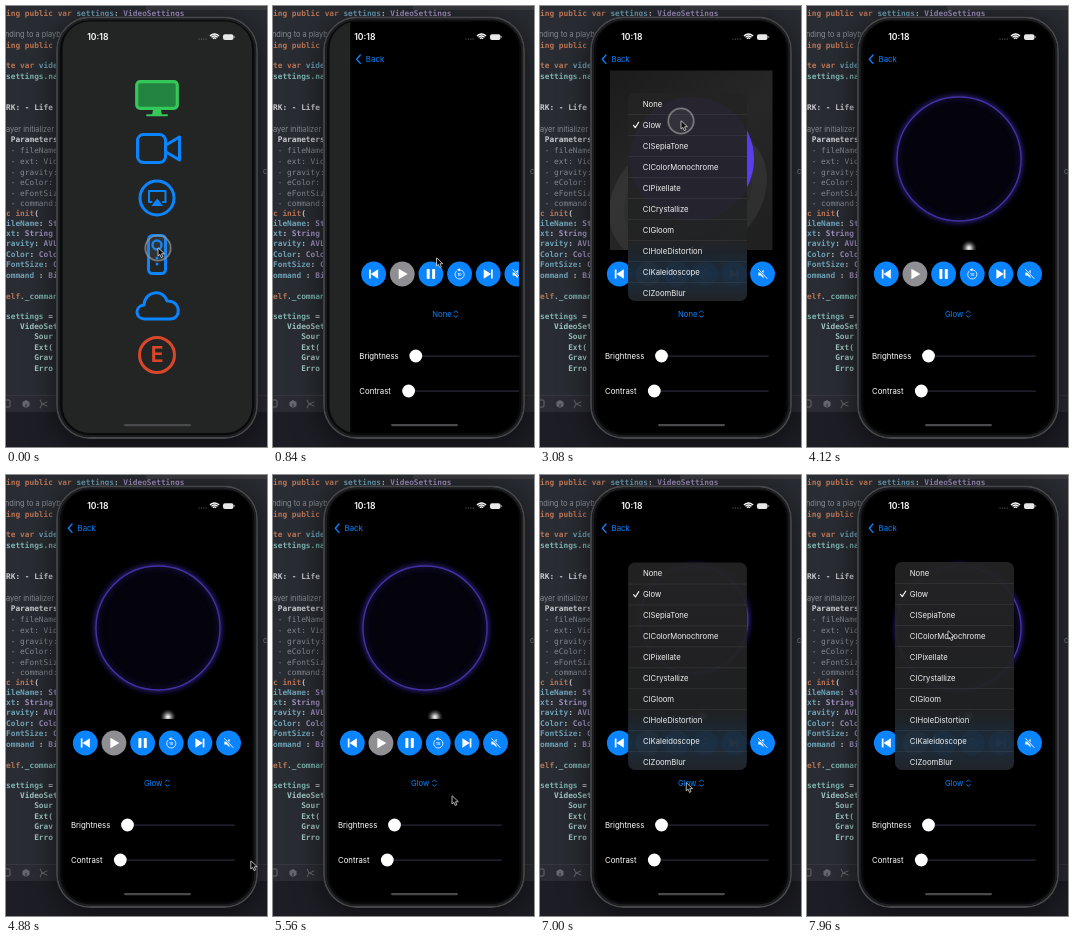
Write an HTML page with a canvas that moves like this. It is 261 px wide and 441 px high and loops after 8 s.

```html
<!DOCTYPE html>
<html lang="en">
<head>
<meta charset="utf-8">
<title>Player filters</title>
<style>
html, body { margin: 0; width: 100%; height: 100%; overflow: hidden; background: #25282e; }
canvas { display: block; width: 261px; height: 441px; }
</style>
</head>
<body>
<canvas id="stage"></canvas>
<script>
const W = 261, H = 441, LOOP = 8000;
const BLUE = '#0a84ff', GREY = '#8e8e93', WHITE = '#fff';
const SANS = 'Inter, "Liberation Sans", sans-serif';
const MONO = '"DejaVu Sans Mono", "Liberation Mono", monospace';
const canvas = document.getElementById('stage');
const c = canvas.getContext('2d');
const dpr = window.devicePixelRatio || 1;
canvas.width = W * dpr;
canvas.height = H * dpr;

const clamp = v => Math.max(0, Math.min(1, v));
const span = (t, a, b) => clamp((t - a) / (b - a));
const smooth = p => p * p * (3 - 2 * p);
const easeOut = p => 1 - (1 - p) ** 3;
const mix = (a, b, p) => a + (b - a) * p;

function text(s, x, y, size, color, weight = 400, align = 'left', family = SANS) {
  c.font = `${weight} ${size}px ${family}`;
  c.textAlign = align;
  c.textBaseline = 'middle';
  c.fillStyle = color;
  c.fillText(s, x, y);
}
function box(x, y, w, h, r, fill) {
  c.beginPath();
  c.roundRect(x, y, w, h, r);
  if (fill) { c.fillStyle = fill; c.fill(); }
}
function disc(x, y, r, fill) {
  c.beginPath();
  c.arc(x, y, r, 0, Math.PI * 2);
  if (fill) { c.fillStyle = fill; c.fill(); }
}
function pen(color, width) {
  c.strokeStyle = color;
  c.lineWidth = width;
  c.lineCap = c.lineJoin = 'round';
  c.stroke();
}
function poly(pts, fill) {
  c.beginPath();
  for (let i = 0; i < pts.length; i += 2) c.lineTo(pts[i], pts[i + 1]);
  if (fill) { c.closePath(); c.fillStyle = fill; c.fill(); }
}
function layer(draw, alpha = 1) {
  c.save();
  c.globalAlpha *= alpha;
  draw();
  c.restore();
}

// Editor behind the phone: [y, [text, colour], ...]
const WORD = '#b87556', NAME = '#6fa3b8', TYPE = '#a593c4', TEAL = '#7fb5b0';
const MINT = '#a3c9c4', DIM = '#858a91', PALE = '#c9cbcf';
const CODE = [
  [8, ['ing public var ', WORD], ['settings', NAME], [': ', PALE], ['VideoSettings', TYPE]],
  [40, ['ing ', WORD], ['public ', WORD], ['v', WORD]],
  [60, ['te var ', WORD], ['vide', NAME]],
  [71, ['settings', TEAL], ['.nam', TEAL]],
  [102, ['RK: - Life', PALE]],
  [134, [' Parameters', PALE]],
  [145, [' - fileName', DIM]],
  [156, [' - ext: Vide', DIM]],
  [167, [' - gravity:', DIM]],
  [177, [' - eColor:', DIM]],
  [188, [' - eFontSiz', DIM]],
  [198, [' - command:', DIM]],
  [208, ['c init', WORD], ['(', PALE]],
  [218, ['ileName', NAME], [': ', PALE], ['St', TYPE]],
  [228, ['xt', NAME], [': ', PALE], ['String', TYPE]],
  [238, ['ravity', NAME], [': ', PALE], ['AVL', TYPE]],
  [249, ['Color', NAME], [': ', PALE], ['Colo', TYPE]],
  [259, ['FontSize', NAME], [': ', PALE], ['C', TYPE]],
  [270, ['ommand ', NAME], [': ', PALE], ['Bi', TYPE]],
  [291, ['elf', WORD], ['._comman', TEAL]],
  [311, ['settings', TEAL], [' =', PALE]],
  [321, ['   VideoSet', MINT]],
  [331, ['      Sour', MINT]],
  [342, ['      Ext(', MINT]],
  [352, ['      Grav', MINT]],
  [363, ['      Erro', MINT]]
];

function editor() {
  c.fillStyle = '#292c32';
  c.fillRect(0, 0, W, H);
  c.fillStyle = '#3a3b3f';
  c.fillRect(140, 0, 121, 4);
  for (const [y, ...parts] of CODE) {
    let x = 0;
    for (const [s, color] of parts) {
      text(s, x, y, 7.8, color, color === DIM ? 400 : 700, 'left', MONO);
      x += c.measureText(s).width;
    }
  }
  text('nding to a playb', -1, 29, 7.4, DIM);
  text('ayer initializer', 0, 124, 7.4, DIM);
  text('c', 257, 165.5, 7.4, DIM);

  c.fillStyle = '#2b2c33';
  c.fillRect(0, 389, W, 17);
  c.fillStyle = '#37383e';
  c.fillRect(0, 389, W, 1);
  c.fillStyle = '#1d1d25';
  c.fillRect(0, 406, W, 35);
  const ink = '#66686e';
  box(-3, 394, 7, 7, 1); pen(ink, 1);
  poly([20, 394, 23.5, 396, 23.5, 400, 20, 402, 16.5, 400, 16.5, 396], ink);
  poly([20, 398, 20, 401]); pen('#2b2c33', 1);
  poly([34, 394, 36, 398, 41, 396]); pen(ink, 1);
  poly([34, 402, 36, 398, 41, 400]); pen(ink, 1);
}

const screenPath = () => box(56.5, 15.5, 189.5, 411.5, 27);

function phone() {
  layer(() => {
    c.shadowColor = 'rgba(0,0,0,.6)';
    c.shadowBlur = 30 * dpr;
    c.shadowOffsetY = 5 * dpr;
    box(50, 10.5, 202, 422.5, 34, '#08090a');
  });
  box(51, 11.5, 200, 420.5, 33); pen('#45474a', 1.8);
  box(53, 13.3, 196.2, 416.8, 31); pen('#1d1e20', 1.8);
}

function status() {
  text('10:18', 81.2, 31, 8.6, WHITE, 600);
  for (let i = 0; i < 4; i++) disc(193 + i * 2.4, 33, .6, '#777');
  for (let i = 1; i < 4; i++) {
    c.beginPath();
    c.arc(208.5, 34, i * 2, -Math.PI * .77, -Math.PI * .23);
    c.strokeStyle = WHITE;
    c.lineWidth = 1.4;
    c.lineCap = 'butt';
    c.stroke();
  }
  box(217, 28.3, 10.5, 5.6, 2, '#e8e8e8');
  box(228.2, 30, .9, 2, .5, '#999');
}

function home() {
  c.fillStyle = '#232524';
  c.fillRect(56, 15, 191, 413);
  const green = '#35c759', red = '#d9472b';

  box(130.7, 75.7, 40.6, 26.6, 3.5, '#238340'); pen(green, 3.2);
  poly([147, 104, 155, 104, 156, 109, 146, 109], green);
  poly([141, 109.2, 161, 109.2]); pen(green, 2);

  box(131.5, 128.5, 28, 28, 6); pen(BLUE, 3);
  poly([160, 139, 173.5, 131, 173.5, 154, 160, 146]); pen(BLUE, 3);

  disc(151, 192, 17); pen(BLUE, 3);
  poly([145.5, 196, 143, 196, 143, 185, 159.5, 185, 159.5, 196, 157, 196]); pen(BLUE, 2);
  poly([151.2, 192.5, 157, 200, 145.4, 200], BLUE);

  box(142.5, 229.5, 17, 38, 4); pen(BLUE, 3);
  disc(151, 239, 4.5); pen(BLUE, 2.4);
  disc(151, 252, 1.5, BLUE);
  disc(151, 258, 1.5, BLUE);

  c.beginPath();
  c.moveTo(139, 313);
  c.bezierCurveTo(129, 313, 128, 300, 138, 299);
  c.bezierCurveTo(139, 284, 158, 283, 161, 295);
  c.bezierCurveTo(175, 294, 176, 313, 164, 313);
  c.closePath();
  pen(BLUE, 3);

  disc(151, 349, 17.5); pen(red, 3);
  text('E', 151.2, 349.6, 21, red, 700, 'center');
}

// One plain circle that grows in each time the clip restarts.
function emblem(t, glow) {
  const p = smooth(span((t - 1000) % 5200, 120, 1020));
  if (p <= 0) return;
  const x = mix(167, 152, p), y = mix(97, 153, p), r = mix(5, 62, p);
  if (!glow) { disc(x, y, r, '#5b3df0'); return; }
  layer(() => {
    c.shadowColor = '#3a2aa0';
    c.shadowBlur = 6 * dpr;
    disc(x, y, r, '#04030c');
    pen('#4032a0', 1.4);
  });
}

function video(t) {
  if (t < 1000) return;
  const glow = t >= 3100;
  c.save();
  c.beginPath();
  c.rect(70, 64.5, 162.5, 179.5);
  c.clip();
  if (glow) {
    c.fillStyle = '#000';
    c.fillRect(70, 64, 163, 180);
  } else {
    const bg = c.createLinearGradient(70, 64, 200, 244);
    bg.addColorStop(0, '#1b1b1b');
    bg.addColorStop(.5, '#272727');
    bg.addColorStop(1, '#202020');
    c.fillStyle = bg;
    c.fillRect(70, 64, 163, 180);
    for (let i = 0; i < 5; i++) {
      c.beginPath();
      c.ellipse(148, 190, 84 - i * 16, 64 - i * 12, -.55, 0, 7);
      c.fillStyle = i % 2 ? 'rgba(0,0,0,.1)' : 'rgba(255,255,255,.06)';
      c.fill();
    }
  }
  emblem(t, glow);
  if (glow) {
    const g = c.createRadialGradient(162, 242, 0, 162, 242, 8);
    g.addColorStop(0, '#fff');
    g.addColorStop(.3, '#aaa');
    g.addColorStop(1, 'rgba(60,60,60,0)');
    c.fillStyle = g;
    c.fillRect(153, 234, 18, 10);
  } else {
    poly([161, 239.5, 161, 243, 163.8, 242, 161, 239.5]); pen('#999', .6);
  }
  c.restore();
}

function skip() {
  poly([2.8, -4.5, 4.5, -4.5, 4.5, 4.5, 2.8, 4.5], WHITE);
  poly([-4.5, -4.8, 2.8, 0, -4.5, 4.8], WHITE);
}
const ICONS = [
  () => { c.scale(-1, 1); skip(); },
  () => poly([-3.6, -5.2, 5.4, 0, -3.6, 5.2], WHITE),
  () => { box(-4.2, -5, 3, 10, .7, WHITE); box(1.2, -5, 3, 10, .7, WHITE); },
  () => {
    c.beginPath(); c.arc(0, .4, 4.6, -1.9, 3.9); pen(WHITE, .8);
    poly([-2.6, -4.3, .2, -5.8, .2, -2.8], WHITE);
    text('10', 0, .8, 4, WHITE, 600, 'center');
  },
  skip,
  () => {
    poly([-4.2, -1.6, -2, -1.6, 1, -4.2, 1, 4.2, -2, 1.6, -4.2, 1.6], WHITE);
    poly([-4, -4.5, 4.5, 4.5]); pen(BLUE, 2.2);
    poly([-4, -4.5, 4.5, 4.5]); pen(WHITE, .9);
  }
];

function slider(label, y, start, knob) {
  text(label, 65, y + .3, 7.8, WHITE);
  box(start, y - .6, 229 - start, 1.3, .6, '#2a2838');
  disc(knob, y, 6.4, WHITE);
}

function player(t, press) {
  c.fillStyle = '#000';
  c.fillRect(56, 15, 195, 413);
  poly([66, 49, 62.3, 53.2, 66, 57.4]); pen(BLUE, 1.3);
  text('Back', 71.5, 53.5, 7.9, BLUE);
  video(t);
  ICONS.forEach((icon, i) => layer(() => {
    c.translate(79.3 + i * 28.65, 268);
    disc(0, 0, 12.4, i === 1 ? GREY : BLUE);
    icon();
  }));
  layer(() => {
    text(t < 3100 ? 'None' : 'Glow', 138, 308.3, 7.7, BLUE);
    poly([159.6, 306.6, 161.4, 304.8, 163.2, 306.6]); pen(BLUE, .9);
    poly([159.6, 309.6, 161.4, 311.4, 163.2, 309.6]); pen(BLUE, .9);
  }, 1 - .4 * press);
  slider('Brightness', 350, 115, 121.5);
  slider('Contrast', 385, 108, 114.3);
}

const FILTERS = ['None', 'Glow', 'CISepiaTone', 'CIColorMonochrome', 'CIPixellate',
  'CICrystallize', 'CIGloom', 'CIHoleDistortion', 'CIKaleidoscope', 'CIZoomBlur'];

function menu(t) {
  const first = span(t, 2300, 2650) * (1 - span(t, 3080, 3320));
  const p = easeOut(Math.max(first, span(t, 6700, 7050)));
  if (p <= 0) return;
  const chosen = t < 3000 ? 0 : 1;
  layer(() => {
    c.translate(147, 300);
    c.scale(mix(.2, 1, p), mix(.2, 1, p));
    c.translate(-147, -300);
    const g = c.createLinearGradient(0, 87, 0, 295);
    g.addColorStop(0, 'rgba(36,35,36,.95)');
    g.addColorStop(.72, 'rgba(33,34,36,.95)');
    g.addColorStop(.87, 'rgba(27,45,63,.97)');
    g.addColorStop(1, 'rgba(34,37,41,.97)');
    box(88, 87, 119, 208, 7, g);
    FILTERS.forEach((name, i) => {
      const y = 98 + i * 21;
      text(name, 102.8, y + .2, 7.7, '#f1f1f1');
      if (i) {
        c.fillStyle = 'rgba(120,120,125,.28)';
        c.fillRect(88, y - 10.7, 119, .6);
      }
      if (i === chosen) {
        poly([93.5, y + .3, 95.3, y + 2.6, 98.7, y - 2.8]);
        pen(WHITE, 1.1);
      }
    });
  }, clamp(p * 1.3));
}

// Pointer path: time, x, y
const PATH = [
  [0, 152, 242], [440, 152, 242], [840, 163.5, 252], [1250, 163.5, 252], [1900, 148, 307],
  [2350, 148, 307], [2860, 141, 115], [3350, 141, 115], [3351, 264, 405], [4650, 264, 405],
  [5400, 179, 321], [5640, 179, 321], [6200, 146.3, 309.5], [6950, 146.3, 309.5],
  [7800, 141, 156], [8000, 141, 156]
];
const PRESSES = [[-200, 280], [2100, 2290], [2930, 3090], [6380, 6650]];

function pointer(t) {
  const i = PATH.findIndex(k => k[0] > t);
  const a = PATH[i - 1], b = PATH[i];
  const p = smooth(span(t, a[0], b[0]));
  return [mix(a[1], b[1], p), mix(a[2], b[2], p)];
}
function pressed(t) {
  return Math.max(...PRESSES.map(([a, b]) => span(t, a, a + 70) * (1 - span(t, b, b + 120))));
}

function cursor(x, y, press) {
  layer(() => {
    disc(x, y, 12.7, 'rgba(130,130,130,.15)');
    pen('rgba(150,150,150,.72)', 1.8);
  }, press);
  layer(() => {
    c.translate(x, y);
    poly([0, 0, 0, 8, 1.9, 6.4, 3.2, 9.5, 4.8, 8.8, 3.5, 5.8, 6, 5.7], '#050505');
    pen('#ddd', .8);
  });
}

function draw(t) {
  c.setTransform(dpr, 0, 0, dpr, 0, 0);
  const press = pressed(t);
  const [x, y] = pointer(t);
  const onPicker = Math.abs(y - 308) < 8;
  const push = easeOut(span(t, 520, 1140));
  editor();
  phone();
  c.save();
  screenPath();
  c.clip();
  if (push < 1) layer(() => { c.translate(-57 * push, 0); home(); });
  if (push > 0) layer(() => {
    c.translate(190 * (1 - push), 0);
    player(t, onPicker ? press : 0);
  });
  status();
  menu(t);
  box(118, 418, 67, 2.2, 1.1, '#4a4a4c');
  c.restore();
  cursor(x, y, press);
}

function frame(now) {
  draw(now % LOOP);
  requestAnimationFrame(frame);
}
requestAnimationFrame(frame);
</script>
</body>
</html>
```
